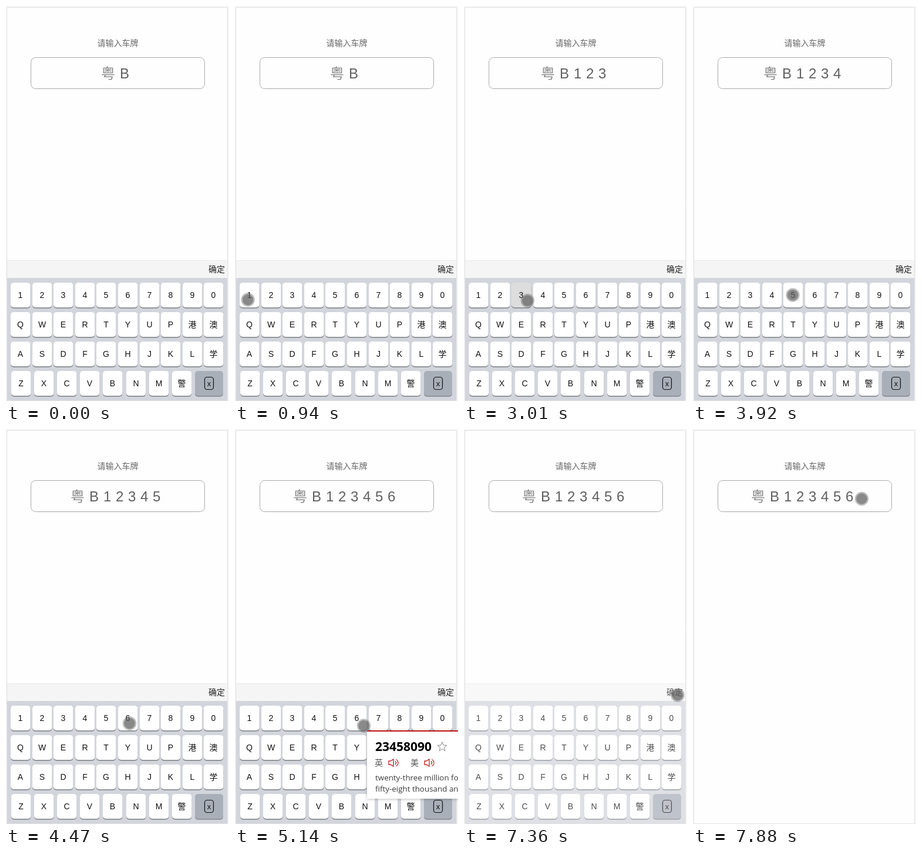
Recreate the animation shown at these times as an HTML page with a canvas. Size 380x671 px, loop 8000 ms.

```html
<!DOCTYPE html>
<html lang="zh">
<head>
<meta charset="utf-8">
<title>车牌键盘</title>
<style>
  html, body { margin: 0; width: 100%; height: 100%; overflow: hidden; background: #f6f6f6; }
  canvas { display: block; width: 380px; height: 671px; }
</style>
</head>
<body>
<canvas id="stage" width="380" height="671"></canvas>
<script>
const ctx = document.getElementById('stage').getContext('2d');
const LOOP = 8000;
const STEP = 120;
const LATIN = '"Liberation Sans", "Noto Sans CJK SC", sans-serif';
const CJK = '"Noto Sans CJK SC", "Noto Sans CJK", sans-serif';
const HUMANIST = '"Open Sans", "Noto Sans", sans-serif';
const PAGE = '#fefefe';

// Pointer glides: start time, number of steps, destination.
const entry = { x: 580, y: 538 };
const glides = [
  { at: 280, steps: 3, x: 97.5, y: 506 },
  { at: 670, steps: 3, x: 22, y: 499 },
  { at: 1650, steps: 1, x: 24, y: 513 },
  { at: 1800, steps: 1, x: 28, y: 542 },
  { at: 1920, steps: 2, x: 50.5, y: 508.5 },
  { at: 2170, steps: 3, x: 60, y: 515 },
  { at: 2590, steps: 3, x: 93, y: 501 },
  { at: 3010, steps: 4, x: 128, y: 500 },
  { at: 3790, steps: 2, x: 170, y: 491 },
  { at: 4190, steps: 3, x: 210.5, y: 500 },
  { at: 5140, steps: 1, x: 219.5, y: 504 },
  { at: 5290, steps: 2, x: 238, y: 498 },
  { at: 5590, steps: 2, x: 241.5, y: 608 },
  { at: 5890, steps: 3, x: 330, y: 548 },
  { at: 6260, steps: 5, x: 364, y: 452 },
  { at: 7630, steps: 3, x: 287.5, y: 118.5 }
];

const pressTimes = [1650, 2440, 3010, 3640, 4190, 4870];
const PRESS_HOLD = 140;
const rows = ['1234567890', 'QWERTYUP港澳', 'ASDFGHJKL学', 'ZXCVBNM警'];

const easeOut = p => 1 - (1 - p) ** 2;
const mix = (a, b, p) => a + (b - a) * p;

function text(str, x, y, font, color, align = 'center') {
  ctx.font = font;
  ctx.fillStyle = color;
  ctx.textAlign = align;
  ctx.fillText(str, x, y);
}

function rect(x, y, w, h, color) {
  ctx.fillStyle = color;
  ctx.fillRect(x, y, w, h);
}

function fillRound(x, y, w, h, r, color) {
  ctx.beginPath();
  ctx.roundRect(x, y, w, h, r);
  ctx.fillStyle = color;
  ctx.fill();
}

function strokeRound(x, y, w, h, r, color, line) {
  ctx.beginPath();
  ctx.roundRect(x, y, w, h, r);
  ctx.strokeStyle = color;
  ctx.lineWidth = line;
  ctx.stroke();
}

function disc(x, y, r, color) {
  ctx.beginPath();
  ctx.arc(x, y, r, 0, Math.PI * 2);
  ctx.fillStyle = color;
  ctx.fill();
}

function drawPage(count) {
  rect(0, 0, 380, 671, '#f6f6f6');
  rect(2, 3, 375, 668, PAGE);
  text('请输入车牌', 190.5, 68, '14px ' + CJK, '#666');
  strokeRound(42.5, 87.5, 296, 53, 8, '#aaa', 1);

  const plate = '粤B' + '123456'.slice(0, count);
  const advance = ch => ch === '粤' ? 32 : ch === 'B' ? 24 : 21;
  const width = [...plate].reduce((sum, ch) => sum + advance(ch), 0);
  let x = Math.floor(190.5 - width / 2);
  for (const ch of plate) {
    const cjk = ch === '粤';
    text(ch, x, 123, '24px ' + (cjk ? CJK : LATIN), cjk ? '#888' : '#606060', 'left');
    x += advance(ch);
  }
}

function drawKey(x, y, w, color) {
  fillRound(x, y + 1.8, w, 42, 5, '#8a8d93');
  fillRound(x, y, w, 42, 5, color);
}

function drawKeyboard(active) {
  rect(2, 432, 375, 30, '#f5f5f5');
  rect(2, 432, 375, 1, '#e9e9e9');
  text('确定', 373, 452, '14px ' + CJK, '#222', 'right');
  rect(2, 462, 375, 209, '#d2d5dc');
  rows.forEach((row, r) => {
    const [left, pitch] = r === 3 ? [9, 39.1] : [8, 36.6];
    const y = 470 + r * 50;
    [...row].forEach((ch, i) => {
      const x = Math.round(left + i * pitch);
      drawKey(x, y, 33.4, ch === active ? '#ddd' : '#fff');
      text(ch, x + 16.5, y + 26, '14px ' + LATIN, '#111');
    });
  });
  drawKey(322, 620, 48, '#a9afb9');
  strokeRound(338.5, 630.5, 15, 21, 4, '#111', 1.2);
  text('x', 346, 645.5, '13px ' + LATIN, '#111');
}

function drawSpeaker(x, y) {
  ctx.strokeStyle = '#c62020';
  ctx.lineWidth = 1.3;
  ctx.beginPath();
  ctx.moveTo(x, y - 3);
  ctx.lineTo(x + 3, y - 3);
  ctx.lineTo(x + 8, y - 6);
  ctx.lineTo(x + 8, y + 6);
  ctx.lineTo(x + 3, y + 3);
  ctx.lineTo(x, y + 3);
  ctx.closePath();
  ctx.stroke();
  for (const r of [3, 6.5]) {
    ctx.beginPath();
    ctx.arc(x + 9.5, y, r, -1.1, 1.1);
    ctx.stroke();
  }
}

function drawStar(cx, cy, r) {
  ctx.beginPath();
  for (let i = 0; i < 10; i++) {
    const a = i * Math.PI / 5 - Math.PI / 2;
    const d = i % 2 ? r * 0.42 : r;
    ctx.lineTo(cx + d * Math.cos(a), cy + d * Math.sin(a));
  }
  ctx.closePath();
  ctx.strokeStyle = '#888';
  ctx.lineWidth = 1;
  ctx.stroke();
}

function drawPopup() {
  ctx.save();
  ctx.shadowColor = 'rgba(0,0,0,.25)';
  ctx.shadowBlur = 5;
  ctx.shadowOffsetY = 1;
  rect(225, 512, 160, 116, '#fff');
  ctx.restore();
  rect(225, 512, 155, 2, '#c01818');
  text('23458090', 239, 547, 'bold 21px ' + HUMANIST, '#000', 'left');
  drawStar(353, 540, 8.5);
  [['英', 238], ['美', 299]].forEach(([label, x]) => {
    text(label, x, 572, '14px ' + CJK, '#555', 'left');
    drawSpeaker(x + 24, 567);
  });
  ['twenty-three million four', 'fifty-eight thousand and'].forEach((line, i) => {
    text(line, 239, 597 + i * 19, '13.4px ' + HUMANIST, '#3c3c3c', 'left');
  });
}

function drawPointer(t) {
  const i = glides.findLastIndex(g => t >= g.at);
  if (i < 0) return;
  const to = glides[i];
  const from = glides[i - 1] || entry;
  // The pointer jumps once per step rather than sliding.
  const step = Math.min(to.steps, Math.floor((t - to.at) / STEP) + 1);
  const p = easeOut(step / to.steps);
  const x = mix(from.x, to.x, p);
  const y = mix(from.y, to.y, p);
  disc(x, y, 11.7, 'rgba(100,100,100,.42)');
  disc(x, y, 9.3, 'rgba(90,90,90,.53)');
}

function keyboardOpacity(t) {
  return t < 7360 ? 1 : t < 7480 ? 0.75 : t < 7630 ? 0.06 : 0;
}

function draw(t) {
  const count = pressTimes.filter(at => t >= at).length;
  const pressed = count > 0 && t < pressTimes[count - 1] + PRESS_HOLD;
  const opacity = keyboardOpacity(t);
  drawPage(count);
  if (opacity > 0) {
    drawKeyboard(pressed ? String(count) : '');
    // Fade the finished keyboard as one layer.
    ctx.globalAlpha = 1 - opacity;
    rect(2, 432, 375, 239, PAGE);
    ctx.globalAlpha = 1;
  }
  strokeRound(1.5, 2.5, 376, 668, 0, '#e2e2e2', 1);
  if (t >= 5140 && t < 5440) drawPopup();
  drawPointer(t);
}

const start = performance.now();
function tick() {
  draw((performance.now() - start) % LOOP);
  requestAnimationFrame(tick);
}
tick();
</script>
</body>
</html>
```
